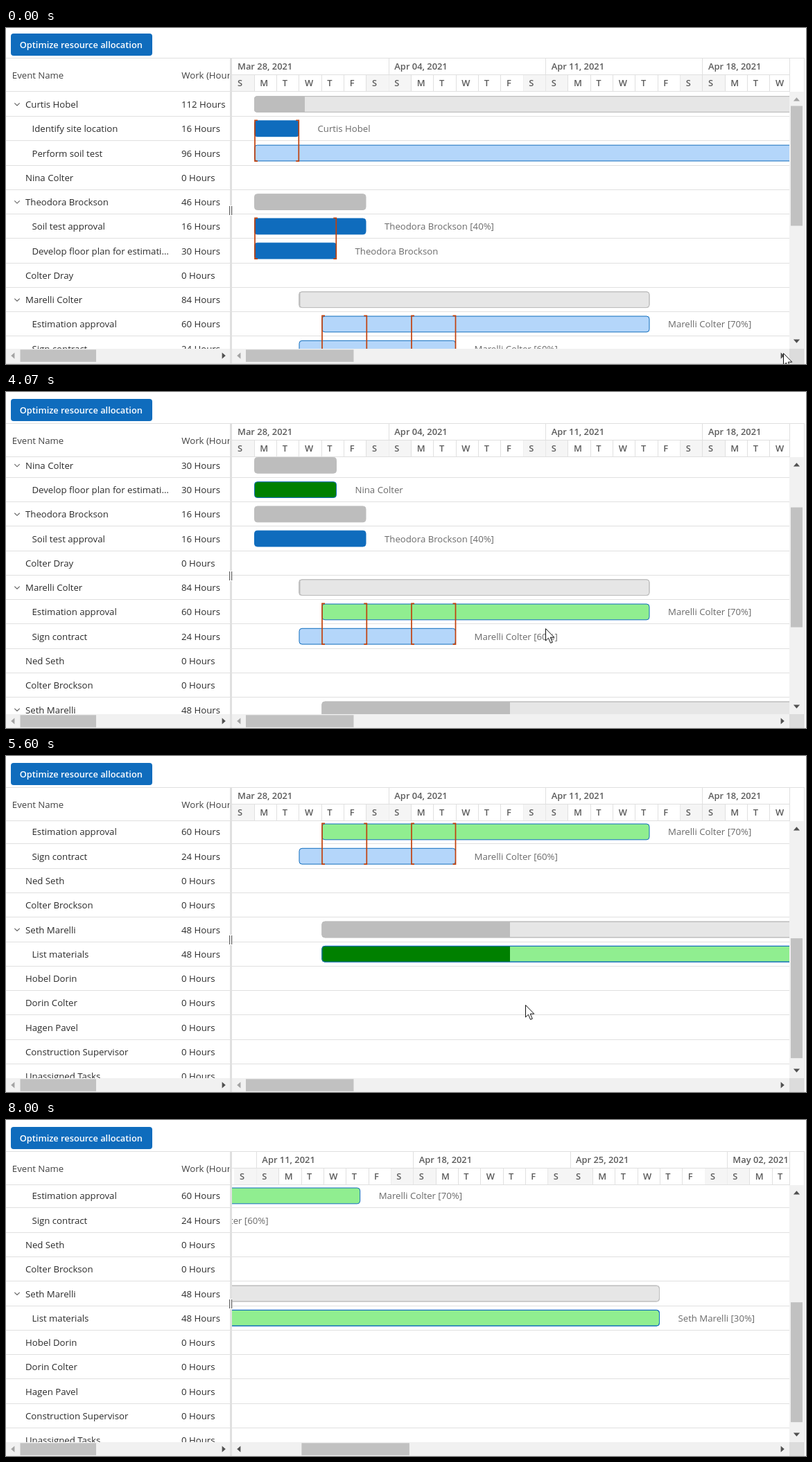
Write an HTML page that moves like this. It is 1154x485 px and loops after 8940 ms.

```html
<!DOCTYPE html>
<html lang="en">
<head>
<meta charset="utf-8">
<title>Resource allocation</title>
<style>
  html, body { margin: 0; width: 100%; height: 100%; overflow: hidden; background: #fff; }
  svg { display: block; font: 13.2px "Open Sans", "Noto Sans", sans-serif; fill: #2b2b2b; }
  text { white-space: pre; }
  .bold { font-size: 12.9px; font-weight: 600; fill: #5c5c5c; }
  .head { fill: #424242; }
  .label { fill: #6a6a6a; }
  .line { stroke: #e0e0e0; fill: none; shape-rendering: crispEdges; }
  .clash { stroke: #c2410c; stroke-width: 1.7; fill: none; }
  .chevron { stroke: #616161; stroke-width: 1.1; fill: none; }
  .action { font-size: 12.8px; font-weight: 600; fill: #fff; }
</style>
</head>
<body>
<svg id="stage" width="1154" height="485" viewBox="0 0 1154 485"></svg>
<script>
const LOOP = 8940, TICK = 200 / 3;
const ROW = 35.27, FIRST = 110.2, LEFT = 326, RIGHT = 1130, TOP = 92, BOTTOM = 463;
const DAY = 226.33 / 7, H_RATIO = 5.19, V_RATIO = 0.4646;

// fill, progress fill, border
const GREY = ['#e6e6e6', '#bdbdbd', '#bdbdbd'];
const BLUE = ['#b4d6fa', '#0f6cbd', '#0f6cbd'];
const GREEN = ['#90ee90', '#008000', '#0f6cbd'];

const bar = (x, end, done, skin, label = '') => ({ x, end, done, skin, label });
const group = (name, hours, b) => ({ name, hours, bar: b, x: 28, open: !!b });
const task = (name, hours, b) => ({ name, hours, bar: b, x: 37.5 });

function makeRows(optimized) {
  const skin = optimized ? GREEN : BLUE;
  const soil = task('Soil test approval', 16, bar(358, 519.5, 519.5, BLUE, 'Theodora Brockson [40%]'));
  const plan = task('Develop floor plan for estimati…', 30,
    bar(358, 477, 477, skin, optimized ? 'Nina Colter' : 'Theodora Brockson'));
  const lead = hours => group('Theodora Brockson', hours, bar(358, 519.5, 519.5, GREY));
  const middle = optimized
    ? [group('Nina Colter', 30, bar(358, 477, 477, GREY)), plan, lead(16), soil]
    : [group('Nina Colter', 0), lead(46), soil, plan];
  return [
    group('Curtis Hobel', 112, bar(358, 1290, 431, GREY)),
    task('Identify site location', 16, bar(358, 423, 423, BLUE, 'Curtis Hobel')),
    task('Perform soil test', 96, bar(358, 1290, 358, BLUE, 'Curtis Hobel')),
    ...middle,
    group('Colter Dray', 0),
    group('Marelli Colter', 84, bar(422.5, 928.5, 424.5, GREY)),
    task('Estimation approval', 60, bar(455.5, 928.5, 455.5, skin, 'Marelli Colter [70%]')),
    task('Sign contract', 24, bar(422.5, 649, 422.5, BLUE, 'Marelli Colter [60%]')),
    group('Ned Seth', 0),
    group('Colter Brockson', 0),
    group('Seth Marelli', 48, bar(455.5, 1360.3, 727, GREY)),
    task('List materials', 48, bar(455.5, 1360.3, 727, skin, 'Seth Marelli [30%]')),
    ...['Hobel Dorin', 'Dorin Colter', 'Hagen Pavel', 'Construction Supervisor', 'Unassigned Tasks']
      .map(name => group(name, 0))
  ];
}

const text = (x, y, s, cls = '') => `<text x="${x}" y="${y}" class="${cls}">${s}</text>`;
const rect = (x, y, w, h, fill, more = '') =>
  `<rect x="${x}" y="${y}" width="${w}" height="${h}" fill="${fill}" ${more}/>`;
const path = (d, more) => `<path d="${d}" ${more}/>`;
const line = d => path(d, 'class="line"');
const clip = (id, x, y, w, h) => `<clipPath id="${id}">${rect(x, y, w, h, '#000')}</clipPath>`;
const center = i => FIRST + ROW * i;

function drawBar({ x, end, done, skin, label }, c) {
  const y = c - 11.6, h = 22.8, w = done - x, r = Math.min(4, w);
  const box = fill => rect(x + .5, y, end - x - 1, h, fill, `rx="4" stroke="${skin[2]}"`);
  let out = box(skin[0]);
  if (done >= end) {
    out = box(skin[1]);
  } else if (w > 0) {
    out += path(`M${done} ${y}H${x + r}q${-r} 0 ${-r} 4v${h - 8}q0 4 ${r} 4H${done}Z`, `fill="${skin[1]}"`);
    out += box('none');
  }
  return out + (label ? text(end + 26.5, c + 4.8, label, 'label') : '');
}

function drawClash(a, b, row) {
  const y = center(row) - 12.2, end = center(row + 1) + 11.3;
  return path(`M${a + 4} ${y}H${a}V${end}h4M${b - 4} ${y}H${b}V${end}h-4`, 'class="clash"');
}

const drawNames = rows => rows.map((r, i) => {
  const y = center(i) + 4.8;
  return text(r.x, y, r.name) + text(253, y, r.hours + ' Hours') +
    (r.open ? path(`M12.3 ${y - 6.6}l3.7 3.6l3.7-3.6`, 'class="chevron"') : '');
}).join('');

const drawBars = (rows, optimized) =>
  rows.map((r, i) => r.bar ? drawBar(r.bar, center(i)) : '').join('') +
  drawClash(359, 422.3, 1) + (optimized ? '' : drawClash(359, 476.3, 5)) +
  drawClash(456, 520.3, 9) + drawClash(585, 648.5, 9);

function drawCalendar() {
  const weeks = ['Mar 28', 'Apr 04', 'Apr 11', 'Apr 18', 'Apr 25', 'May 02'];
  let out = '';
  weeks.forEach((week, k) => {
    const wx = LEFT + DAY * 7 * k;
    out += text(wx + 8, 60, week + ', 2021', 'bold');
    if (k) out += line(`M${wx} 44V67`);
    [...'SMTWTFS'].forEach((d, j) => {
      const x = wx + DAY * j;
      if (j % 6 === 0) out += rect(x, 68, DAY, 24, '#f5f5f5');
      out += line(`M${x + DAY} 67V92`) + text(x + 8, 83.8, d, 'bold');
    });
  });
  return out;
}

function arrow(id, x, y, angle, on) {
  return path('M-2.8 0L2.4-4.6V4.6Z',
    `id="${id}" transform="translate(${x} ${y}) rotate(${angle})" fill="${on ? '#505050' : '#a3a3a3'}"`);
}

const before = makeRows(false), after = makeRows(true);
const rowLines = (x, end) => before.map((r, i) => line(`M${x} ${FIRST + 17.3 + ROW * i}H${end}`)).join('');

document.getElementById('stage').innerHTML = `
  <defs>
    ${clip('names', 0, TOP, 323, BOTTOM - TOP)}
    ${clip('bars', LEFT, TOP, RIGHT - LEFT, BOTTOM - TOP)}
    ${clip('dates', LEFT, 43, RIGHT - LEFT, 50)}
    ${clip('titles', 0, 43, 322.5, 50)}
  </defs>
  <g id="app">
    ${rect(7, 8, 204, 32, '#0f6cbd', 'id="button" rx="4"')}
    ${text(19.8, 29.2, 'Optimize resource allocation', 'action')}
    <g clip-path="url(#names)"><g id="nameRows">
      ${rowLines(0, 323)}
      <g class="before">${drawNames(before)}</g><g class="after">${drawNames(after)}</g>
    </g></g>
    <g clip-path="url(#bars)"><g id="lines">${rowLines(LEFT, RIGHT)}</g><g id="barRows">
      <g class="before">${drawBars(before, false)}</g><g class="after">${drawBars(after, true)}</g>
    </g></g>
    <g clip-path="url(#titles)">${text(8.8, 72.8, 'Event Name', 'head')}${text(253.3, 72.8, 'Work (Hours)', 'head')}</g>
    <g clip-path="url(#dates)"><g id="dateCells">${drawCalendar()}</g></g>
    ${line('M0 43.5H1152M326 67.5H1130M0 91.5H1130M1130.5 44V92M1151.5 44V484M0 484.5H1152')}
    ${rect(0, BOTTOM, 323, 21, '#f1f1f1')}${rect(20.5, 464.3, 109.5, 17.6, '#c1c1c1')}
    ${arrow('', 10, 473, 0, false)}${arrow('', 314, 473, 180, true)}
    ${rect(LEFT, BOTTOM, RIGHT - LEFT, 21, '#f1f1f1')}${rect(346, 464.3, 155.5, 17.6, '#c1c1c1', 'id="hThumb"')}
    ${arrow('back', 336, 473, 0, false)}${arrow('', 1120, 473, 180, true)}
    ${rect(RIGHT, TOP, 20.5, BOTTOM - TOP, '#f1f1f1')}${rect(1132, 112.5, 17, 173, '#c1c1c1', 'id="vThumb"')}
    ${arrow('up', 1140.5, 103, 90, false)}${arrow('', 1140.5, 452, -90, true)}
    ${rect(RIGHT, BOTTOM, 21, 21, '#dcdcdc')}
    ${rect(323, 44, 3, 441, '#e0e0e0')}
    ${rect(321.5, 256, 5, 15, '#fff')}${rect(322, 257, 1.2, 13, '#616161')}${rect(325, 257, 1.2, 13, '#616161')}
  </g>
  <g id="spinner" fill="none" stroke-width="1.5">
    <circle cx="576" cy="224.7" r="14.8" stroke="#e6eff8"/>
    <path id="arc" d="M565.54 214.24A14.8 14.8 0 0 1 586.46 214.24" stroke="#0f6cbd"/>
  </g>
  <path id="cursor" d="M.5.6V18L4.4 14.2L7.6 21.4L10.3 20.2L7.2 13.2H12.8Z" fill="#fff" stroke="#111"/>`;

// Keys: tick, then values; linear in between
const V_SCROLL = [[60, 0], [61, 112], [62, 145], [63, 160], [68, 160], [69, 193.3], [70, 235],
  [71, 262], [72, 275], [76, 275], [77, 305], [78, 320]];
const H_SCROLL = [[102, 0], [103, 109.3], [112, 417.3]];
const POINTER = [[0, 1121, 469], [1, 700, 260], [2, 227, 33], [6, 227, 33], [10, 187, 24], [20, 187, 24],
  [27, 187, 484], [28, 187, 600], [47, 187, 600], [48, 550, 379], [50, 550, 379], [54, 778, 341],
  [83, 778, 341], [84, 749, 359], [88, 640, 410], [92, 545, 452], [96, 501, 470], [102, 501, 470],
  [103, 522, 470], [112, 581.5, 480], [119, 581.5, 480], [120, 581.5, 600]];
const BUTTON = [[0, '#0f6cbd'], [9, '#115ea3'], [16, '#0c4d87'], [20, '#115ea3'], [48, '#0f6cbd']];
const THUMB = [[0, '#c1c1c1'], [95, '#a8a8a8'], [100, '#787878'], [115, '#a8a8a8'], [119, '#c1c1c1']];

function tween(keys, n) {
  const i = keys.findIndex(k => k[0] > n);
  if (i === 0) return keys[0].slice(1);
  if (i < 0) return keys[keys.length - 1].slice(1);
  const a = keys[i - 1], b = keys[i], p = (n - a[0]) / (b[0] - a[0]);
  return a.slice(1).map((v, j) => v + (b[j + 1] - v) * p);
}
const step = (keys, n) => keys.filter(k => k[0] <= n).pop()[1];

function tickAt(t) {
  const n = Math.floor((t + 4) / TICK);
  return Math.round(n * TICK / 10) * 10 > t ? n - 1 : n;
}

const el = id => document.getElementById(id);
const set = (id, name, value) => el(id).setAttribute(name, value);
const move = (id, x, y) => set(id, 'transform', `translate(${x} ${y})`);
const show = (node, on) => node.style.display = on ? '' : 'none';

function render(t) {
  const n = Math.max(0, tickAt(t)), optimized = n >= 48;
  const [sy] = tween(V_SCROLL, n), [sx] = tween(H_SCROLL, n);
  document.querySelectorAll('.before').forEach(g => show(g, !optimized));
  document.querySelectorAll('.after').forEach(g => show(g, optimized));
  move('app', 0, optimized ? 2 : 0);
  move('nameRows', 0, -sy);
  move('lines', 0, -sy);
  move('barRows', -sx, -sy);
  move('dateCells', -sx, 0);
  move('hThumb', sx / H_RATIO, 0);
  move('vThumb', 0, sy * V_RATIO);
  move('cursor', ...tween(POINTER, n));
  set('hThumb', 'fill', step(THUMB, n));
  set('button', 'fill', step(BUTTON, n));
  set('up', 'fill', sy > 0 ? '#505050' : '#a3a3a3');
  set('back', 'fill', sx > 0 ? '#505050' : '#a3a3a3');
  show(el('spinner'), n >= 20 && n < 48);
  set('arc', 'transform', `rotate(${(n - 20) * TICK / 1300 * 360} 576 224.7)`);
}

const start = performance.now();
function loop() {
  render((performance.now() - start) % LOOP);
  requestAnimationFrame(loop);
}
loop();
</script>
</body>
</html>
```
